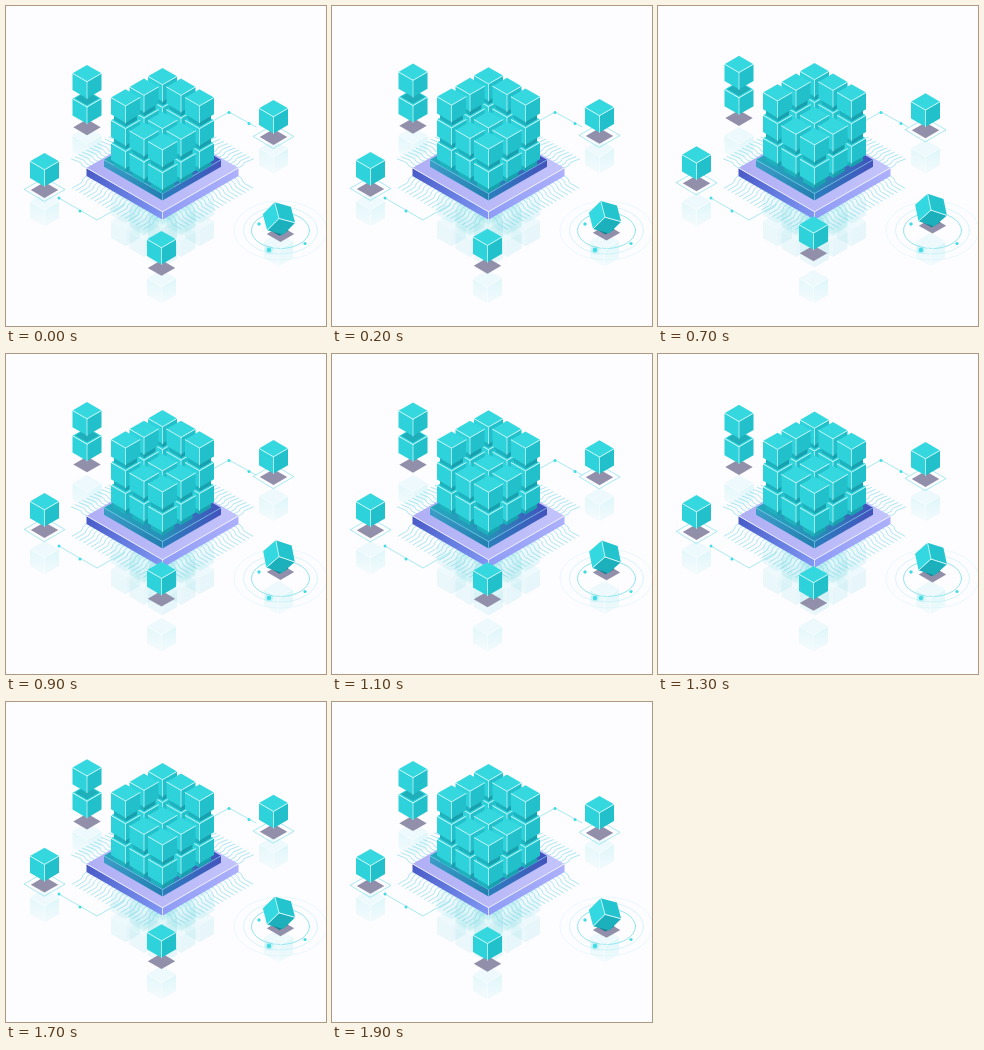
Write an HTML page with a canvas that moves like this. It is 320 px wide and 320 px high and loops after 2000 ms.

```html
<!DOCTYPE html>
<html lang="en">
<head>
<meta charset="utf-8">
<title>Isometric cubes</title>
<style>
html, body { margin: 0; width: 100%; height: 100%; overflow: hidden; background: #fdfcff; }
canvas { display: block; width: 320px; height: 320px; }
</style>
</head>
<body>
<canvas id="stage"></canvas>
<script>
const LOOP = 2000, STEP = 100, LEAD = 35;
const SLOPE = 1 / Math.sqrt(3);
const HALF = 14.5;
const TEAL = { top: '#36d8e0', left: '#2dd2da', right: '#21c0ca', edge: '#d9fbfc' };
const DEEP = { top: '#1eb0bc', left: '#1eb2be', right: '#18a0ae', edge: null };
// Seen from below: the box is drawn upside down, so left and right swap.
const TUMBLED = { top: '#1cb0bc', left: '#24c4ce', right: '#34d8e0', edge: '#d9fbfc' };

const canvas = document.getElementById('stage');
const ctx = canvas.getContext('2d');
const ratio = window.devicePixelRatio || 1;
canvas.width = canvas.height = 320 * ratio;
ctx.lineJoin = ctx.lineCap = 'round';

function trace(points, closed) {
  ctx.beginPath();
  points.forEach(([x, y]) => ctx.lineTo(x, y));
  if (closed) ctx.closePath();
}

function fill(points, color) {
  trace(points, true);
  ctx.fillStyle = color;
  ctx.fill();
}

function line(points, color, width = 0.7, closed = false) {
  trace(points, closed);
  ctx.strokeStyle = color;
  ctx.lineWidth = width;
  ctx.stroke();
}

function dot(x, y, r, color = '#43dce5') {
  ctx.beginPath();
  ctx.arc(x, y, r, 0, 2 * Math.PI);
  ctx.fillStyle = color;
  ctx.fill();
}

function ramp(x0, y0, x1, y1, ...colors) {
  const g = ctx.createLinearGradient(x0, y0, x1, y1);
  colors.forEach((c, i) => g.addColorStop(i / (colors.length - 1), c));
  return g;
}

const diamond = (x, y, w, h = w * SLOPE) =>
  [[x - w, y], [x, y - h], [x + w, y], [x, y + h]];

// Isometric box; (x, y) is the back corner of its top face.
function box(x, y, w, height, skin) {
  const h = w * SLOPE;
  const left = [x - w, y + h], right = [x + w, y + h], mid = [x, y + 2 * h];
  const drop = ([px, py]) => [px, py + height];
  fill([left, mid, drop(mid), drop(left)], skin.left);
  fill([right, mid, drop(mid), drop(right)], skin.right);
  fill([[x, y], right, mid, left], skin.top);
  if (!skin.edge) return;
  line([left, mid, right], skin.edge, 0.9);
  line([mid, drop(mid)], skin.edge, 0.7);
}

const cube = (x, y, w = HALF, skin = TEAL) => box(x, y, w, 2 * w * SLOPE, skin);

const shadow = (x, y) => fill(diamond(x, y, 13.7), '#918fa9');

function ghost(x, y) {
  const fade = (a, b) => ramp(0, y, 0, y + 33, `rgba(150,232,236,${a})`, `rgba(190,242,244,${b})`);
  cube(x, y, HALF, { top: fade(0.16, 0.2), left: fade(0.34, 0.14), right: fade(0.4, 0.18), edge: 'rgba(255,255,255,.6)' });
}

// A 3x3x3 lattice whose top layer keeps only its two back rows.
function block(top, draw) {
  for (let layer = 2; layer >= 0; layer--)
    for (let row = 0; row < 3; row++)
      for (let col = 0; col < 3; col++) {
        if (layer === 0 && row > 0 && col > 0) continue;
        draw(156.5 + (col - row) * 18.5, top + (col + row) * 10.6 + layer * 22.8);
      }
}

function blockReflection() {
  ctx.save();
  ctx.globalAlpha = 0.18;
  block(140, (x, y) => cube(x, y, HALF, {
    top: '#a9edf0', left: '#93e6eb', right: '#85dfe6', edge: '#fff'
  }));
  ctx.restore();
}

function circuits() {
  const color = 'rgba(118,216,236,.8)';
  // Leaves the edge outwards, swings vertical, then runs outwards again.
  function lead(side, dx, y, dir) {
    const x = d => 156.5 + side * (dx + d), at = d => y + dir * d;
    ctx.beginPath();
    ctx.moveTo(x(0), at(0));
    ctx.lineTo(x(3), at(1.7));
    ctx.quadraticCurveTo(x(6), at(3.5), x(6), at(6));
    ctx.quadraticCurveTo(x(6), at(7.5), x(9), at(9));
    ctx.lineTo(x(16), at(13));
    ctx.strokeStyle = color;
    ctx.lineWidth = 0.75;
    ctx.stroke();
  }
  for (const side of [-1, 1]) {
    for (let i = 0; i < 20; i++) lead(side, 3 + i * 3.75, 212 - (3 + i * 3.75) * SLOPE, 1);
    for (let i = 0; i < 11; i++) lead(side, 75 - i * 3.75, 162 - i * 2.17, -0.7);
  }
}

function platform() {
  box(156.5, 118, 76, 8, {
    top: ramp(81, 163, 233, 163, '#b0aff5', '#c3c3fc'),
    left: ramp(81, 165, 156, 212, '#4a5bc8', '#647be0', '#8297f3'),
    right: ramp(156, 212, 233, 165, '#8e9cf6', '#adb0fb'),
    edge: '#f3f3ff'
  });
  box(156.5, 120, 58.5, 7, {
    top: ramp(98, 154, 215, 154, '#25a9be', '#278fb8', '#444fbe'),
    left: ramp(98, 157, 156, 192, '#3c9dc7', '#227fb0'),
    right: ramp(156, 192, 215, 157, '#2a7fbd', '#4453bd'),
    edge: 'rgba(130,220,235,.65)'
  });
}

function wires() {
  const color = '#83e1eb';
  line([[52, 191.5], [91, 214], [119, 198]], color);
  line([[250, 121], [223, 106], [207, 115]], color);
  [[53, 192], [74, 205], [243, 117.5], [223, 106.5]].forEach(([x, y]) => dot(x, y, 1.5));
}

function rings() {
  [[29, 18, 0.8], [37, 23.5, 0.28], [46.5, 29.5, 0.14]].forEach(([rx, ry, alpha]) => {
    ctx.beginPath();
    ctx.ellipse(274.5, 224.5, rx, ry, 0, 0, 2 * Math.PI);
    ctx.strokeStyle = `rgba(105,219,230,${alpha})`;
    ctx.lineWidth = 0.9;
    ctx.stroke();
  });
}

function orbiter(wave) {
  const y = 212.5 - 10 * wave;
  shadow(274.5, y + 15.5);
  fill(diamond(273.5, y + 12, 9), '#157f91');
  ctx.save();
  ctx.translate(273, y);
  ctx.rotate(Math.PI + (-15 + 4 * wave) * Math.PI / 180);
  cube(0, -2 * HALF * SLOPE, HALF, TUMBLED);
  ctx.restore();
  dot(253, 218, 1.7);
  dot(299, 237.5, 1.6);
  dot(263, 244, 4, 'rgba(80,220,230,.2)');
  dot(263, 244, 2.3);
}

const floaters = [
  { x: 81, rest: 59, travel: 11, count: 2, ghostTop: 121 },
  { x: 267.5, rest: 94, travel: 8, count: 1, ghostTop: 134, framed: true },
  { x: 38.5, rest: 147, travel: 8, count: 1, ghostTop: 187, framed: true },
  { x: 155.5, rest: 225, travel: 17.5, count: 1, ghostTop: 264 }
];

function floater({ x, rest, travel, count, framed }, wave) {
  const top = rest - travel * wave, low = top + (count - 1) * 25.3;
  if (framed) line(diamond(x, low + 36.5, 20.5), '#83e1eb', 0.7, true);
  shadow(x, low + 37);
  for (let i = count - 1; i >= 0; i--) {
    cube(x, top + i * 25.3);
    if (i) fill(diamond(x, top + i * 25.3 + 8, 12), '#1fafbb');
  }
}

function draw(time) {
  const wave = (1 - Math.cos(2 * Math.PI * (time + LEAD) / LOOP)) / 2;
  ctx.setTransform(ratio, 0, 0, ratio, 0, 0);
  ctx.fillStyle = '#fdfcff';
  ctx.fillRect(0, 0, 320, 320);
  blockReflection();
  rings();
  floaters.forEach(f => ghost(f.x, f.ghostTop));
  ghost(272.5, 227);
  circuits();
  wires();
  platform();
  block(62 - 6 * wave, (x, y) => {
    cube(x, y + 11, 11.5, DEEP);
    cube(x, y);
  });
  floaters.forEach(f => floater(f, wave));
  orbiter(wave);
}

const start = performance.now();
function tick() {
  const time = (performance.now() - start) % LOOP;
  draw(Math.floor(time / STEP) * STEP);
  requestAnimationFrame(tick);
}
tick();
</script>
</body>
</html>
```
